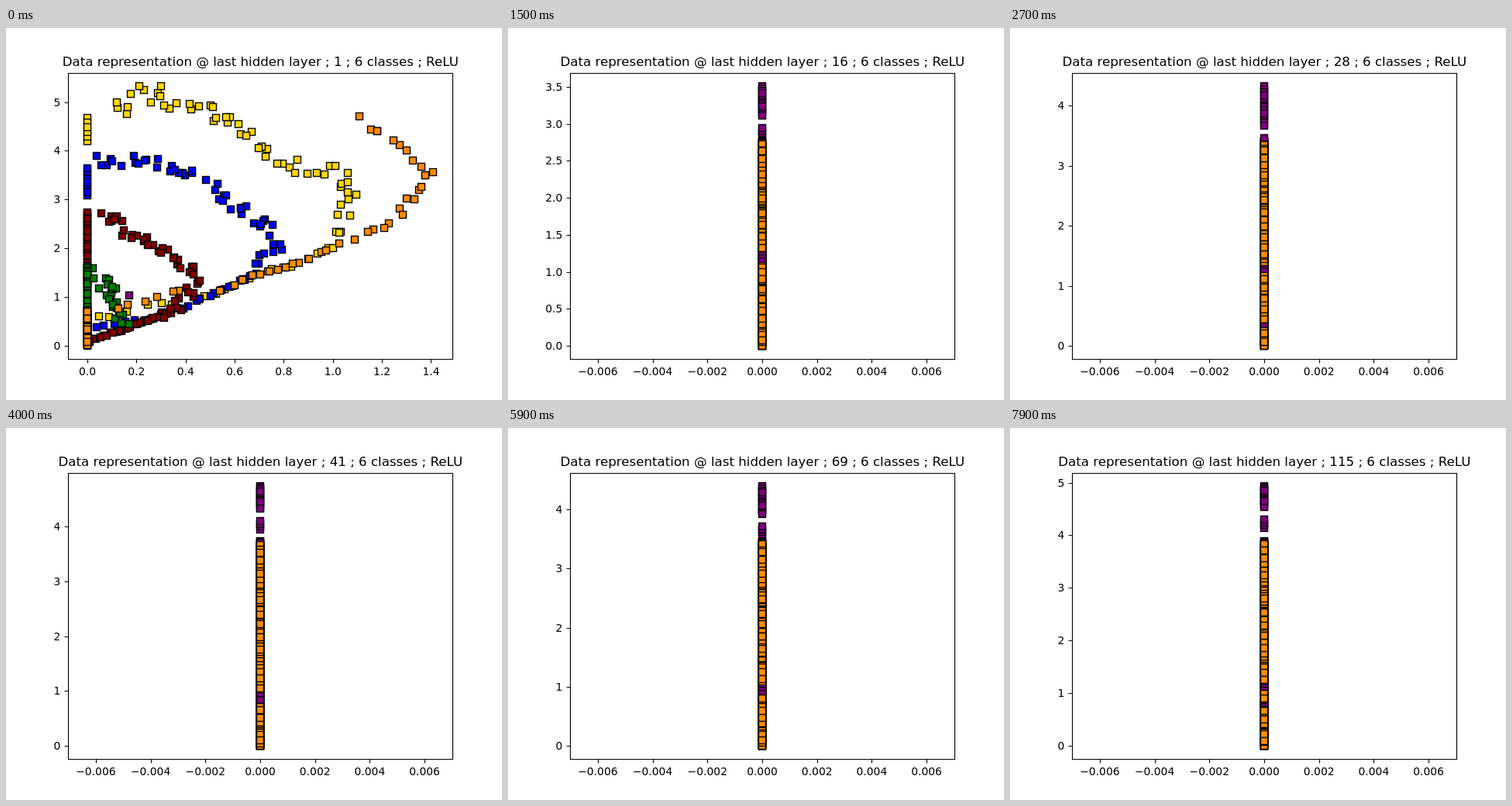
These frames come from a looping animation (640x480 px, 8000 ms). An HTML page with a canvas:

```html
<!DOCTYPE html>
<html lang="en">
<head>
<meta charset="utf-8">
<title>Hidden layer scatter</title>
<style>
  html, body { margin: 0; width: 100%; height: 100%; overflow: hidden; background: #fff; }
  canvas, svg { position: absolute; left: 0; top: 0; width: 640px; height: 480px; }
  text { font: 13.89px "DejaVu Sans", sans-serif; fill: #000; }
  #title { font-size: 16.67px; text-anchor: middle; }
  .x { text-anchor: middle; }
  .y { text-anchor: end; }
  path { fill: none; stroke: #000; stroke-width: 1.11; }
</style>
</head>
<body>
<canvas id="plot" width="640" height="480"></canvas>
<svg viewBox="0 0 640 480">
  <path d="M80.5 58.5H576.5V427.5H80.5Z"/>
  <path id="ticks"/>
  <g id="labels"></g>
  <text id="title" x="328.3" y="49"></text>
</svg>
<script>
const ctx = document.getElementById('plot').getContext('2d');
const ticks = document.getElementById('ticks');
const labels = document.getElementById('labels');
const title = document.getElementById('title');

const LEFT = 105, SPAN = 446, BASE = 410, TOP = 75, MID = 328;
const ORANGE_TOP = 150;
const COLLAPSE = 10;   // step at which every x value has reached zero

function random(seed) {
  return () => {
    seed = (seed + 0x6D2B79F5) | 0;
    let t = Math.imul(seed ^ (seed >>> 15), 1 | seed);
    t = (t + Math.imul(t ^ (t >>> 7), 61 | t)) ^ t;
    return ((t ^ (t >>> 14)) >>> 0) / 4294967296;
  };
}
const rnd = random(20);
const lerp = (a, b, t) => a + (b - a) * t;
const clamp = (v, lo, hi) => Math.max(lo, Math.min(hi, v));
const times = (n, make) => Array.from({ length: n }, (_, i) => make(i));

// Piecewise linear interpolation over rows of [key, ...values]
function along(rows, key) {
  let i = 0;
  while (i < rows.length - 2 && rows[i + 1][0] < key) i++;
  const a = rows[i], b = rows[i + 1];
  const t = clamp((key - a[0]) / (b[0] - a[0]), 0, 1);
  return a.slice(1).map((v, j) => lerp(v, b[j + 1], t));
}

// n dots spread evenly along a bent path, scattered around it
function cloud(n, spread, path) {
  let length = 0;
  const rows = path.map(([x, y], i) => {
    if (i) length += Math.hypot(x - path[i - 1][0], y - path[i - 1][1]);
    return [length, x, y];
  });
  const off = () => (rnd() + rnd() - 1) * spread;
  return times(n, i => {
    const [x, y] = along(rows, (i + rnd()) / n * length);
    return [clamp(x + off(), LEFT, LEFT + SPAN), clamp(y + off(), TOP, BASE)];
  });
}
const column = (n, y1, y2) => times(n, i => [LEFT, lerp(y1, y2, i / (n - 1))]);

const ridge = [[105, 404], [200, 372], [264, 345], [312, 322], [377, 303], [434, 277]];
const trail = (n, x1, x2) => times(n, i => {
  const x = lerp(x1, x2, (i + rnd()) / n);
  return [x, along(ridge, x)[0] + rnd() * 4 - 2];
});

const groups = [
  ['#ffd700', [[200, 75],
    ...cloud(54, 16, [[140, 112], [165, 85], [200, 88], [285, 120], [350, 165],
      [410, 185], [445, 200], [425, 272]]),
    ...cloud(7, 4, [[112, 374], [174, 363], [256, 346]]),
    ...column(6, 116, 146), ...trail(14, 245, 434)]],
  ['#0000ff', [
    ...cloud(48, 14, [[118, 168], [200, 174], [245, 194], [290, 228], [348, 262],
      [350, 285], [320, 308]]),
    ...column(9, 181, 216), ...column(8, 240, 290),
    ...cloud(5, 3, [[115, 385], [166, 377]]), ...trail(20, 150, 330)]],
  ['#800000', [
    ...cloud(44, 14, [[118, 240], [150, 254], [190, 278], [240, 312], [250, 325],
      [238, 346], [201, 371]]),
    ...column(24, 238, 330), ...trail(26, 107, 215)]],
  ['#008000', [
    ...cloud(24, 13, [[117, 318], [130, 332], [142, 358], [152, 386]]),
    ...column(26, 308, 370)]],
  ['#800080', [[159, 345], ...column(84, 372, 408)]],
  ['#ff8c00', [[551, 186],
    ...cloud(22, 7, [[456, 117], [514, 154], [542, 185], [542, 207], [514, 225],
      [505, 252], [450, 272]]),
    ...cloud(6, 4, [[136, 360], [203, 345], [232, 338]]),
    ...trail(14, 275, 434), ...column(38, 364, 410)]]
];
const PURPLE = 4, ORANGE = 5;

function shuffle(list) {
  for (let i = list.length - 1; i > 0; i--) {
    const j = Math.floor(rnd() * (i + 1));
    [list[i], list[j]] = [list[j], list[i]];
  }
  return list;
}

// Each dot gets a slot: its place in the final column
const dots = groups.map(([color, pts]) => {
  const n = pts.length, slots = shuffle([...pts.keys()]);
  return shuffle(pts.map(([x, y], i) => ({
    x, y, color, slot: slots[i],
    u: clamp((slots[i] + rnd() * 1.6 - 0.3) / (n - 1), 0, 1),
    phase: rnd() * 6.28
  })));
});

// step, y maximum, centre of the gap between the purple bands
const stages = [[0, 5.326, 121], [15, 3.508, 121], [27, 4.328, 134], [40, 4.735, 112],
  [52, 4.281, 128], [67, 4.527, 109], [79, 4.934, 110]];
const epochs = [[0, 1], [49, 50], [52, 56], [67, 84], [75, 100], [79, 115]];

function slotY(cls, d, gap, k) {
  if (cls === PURPLE) {
    if (d.slot < 14) return lerp(TOP, gap - 8, d.slot / 13);
    if (d.slot < 18) return lerp(gap + 8, gap + 19, (d.slot - 14) / 3);
    if (d.slot < 22) return ORANGE_TOP - 22 + d.slot;
    return lerp(ORANGE_TOP, BASE, (d.slot - 22) / 62);
  }
  const y = lerp(ORANGE_TOP, BASE, d.u) + 1.5 * Math.sin(d.phase + k * 0.7);
  return clamp(y, ORANGE_TOP, BASE);
}

// Places where orange leaves purple visible; they move every few steps
function holesAt(k) {
  const pick = random(Math.floor(k / 6) + 5);
  return times(2, () => lerp(290, 400, pick()));
}

const snap = v => Math.floor(v + 0.5) + 0.5;
function marker(x, y, color) {
  const l = Math.round(x) - 4.5, t = Math.round(y) - 4.5;
  ctx.fillStyle = color;
  ctx.fillRect(l, t, 9, 9);
  ctx.strokeRect(l, t, 9, 9);
}

function drawDots(k, gap, shrink) {
  const mix = Math.min(1, k / COLLAPSE), flat = shrink >= 1;
  const placed = dots.map((list, cls) => list.map(d => ({
    color: d.color,
    x: flat ? MID : LEFT + Math.max(0, d.x - LEFT - SPAN * shrink) / (1 - shrink),
    y: lerp(d.y, slotY(cls, d, gap, k), mix)
  })));
  const top = Math.min(...placed.flat().map(p => p.y));
  const scale = (BASE - TOP) / (BASE - top);
  const holes = flat ? holesAt(k) : [];

  ctx.clearRect(0, 0, 640, 480);
  ctx.strokeStyle = '#000';
  ctx.lineWidth = 1.39;
  placed.forEach((list, cls) => {
    for (const p of list) {
      const y = BASE - (BASE - p.y) * scale;
      if (cls === ORANGE && holes.some(h => Math.abs(h - y) < 7)) continue;
      marker(p.x, y, p.color);
    }
  });
}

function niceStep(range) {
  const raw = range / 9, mag = 10 ** Math.floor(Math.log10(raw));
  return mag * [1, 2, 2.5, 5, 10].find(s => s * mag >= raw - 1e-9);
}
function tickValues(lo, hi) {
  const step = niceStep(hi - lo), out = [];
  let digits = 0;
  while (digits < 5 && Math.abs(step - step.toFixed(digits)) > 1e-6) digits++;
  for (let i = Math.ceil(lo / step); i * step <= hi; i++) {
    out.push([i * step, (i * step).toFixed(digits).replace('-', '\u2212')]);
  }
  return out;
}
const label = (cls, x, y, s) => `<text class="${cls}" x="${x}" y="${y}">${s}</text>`;

function drawAxes(yMax, xMax) {
  let path = '', text = '';
  const xs = xMax > 0 ? tickValues(-0.056 * xMax, 1.056 * xMax) : tickValues(-0.007, 0.007);
  for (const [v, s] of xs) {
    const x = xMax > 0 ? LEFT + SPAN * v / xMax : MID + v * 35350;
    path += `M${snap(x)} 427.5v4.9`;
    text += label('x', x, 448, s);
  }
  for (const [v, s] of tickValues(-0.05 * yMax, 1.05 * yMax)) {
    const y = BASE - (BASE - TOP) * v / yMax;
    path += `M80.5 ${snap(y)}h-4.9`;
    text += label('y', 70.3, Math.round(y + 5), s);
  }
  ticks.setAttribute('d', path);
  labels.innerHTML = text;
}

function draw(k) {
  const [yMax, gap] = along(stages, k);
  const shrink = Math.min(1, (k / COLLAPSE) ** 0.7);
  const epoch = Math.round(along(epochs, k)[0]);
  drawDots(k, gap, shrink);
  drawAxes(yMax, 1.408 * (1 - shrink));
  title.textContent = `Data representation @ last hidden layer ; ${epoch} ; 6 classes ; ReLU`;
}

let last = -1;
function tick() {
  const k = Math.floor((performance.now() % 8000) / 100);
  if (k !== last) draw(last = k);
  requestAnimationFrame(tick);
}
tick();
</script>
</body>
</html>
```
